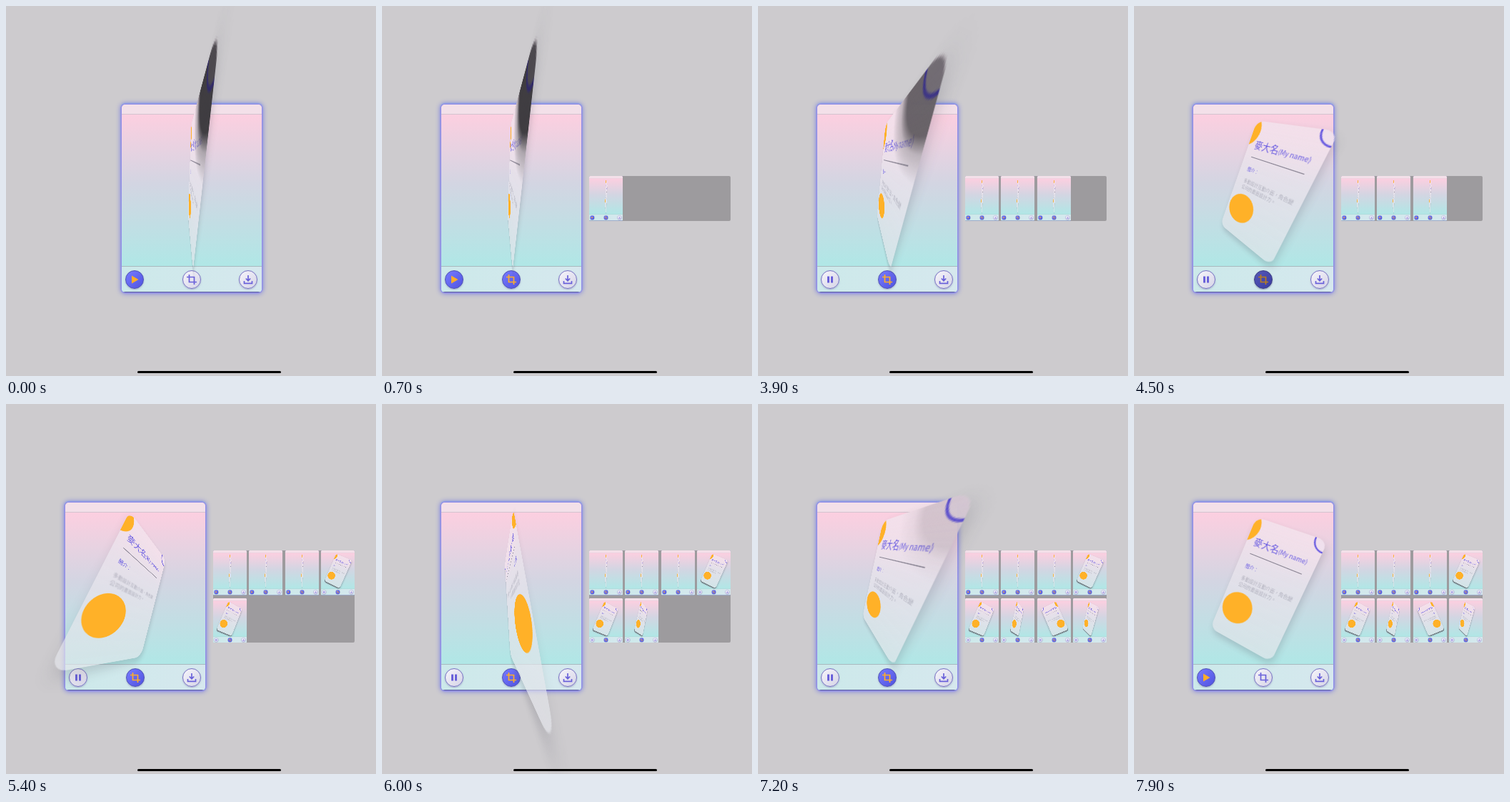
An HTML page that plays this animation: 518x518 px, repeating every 8000 ms.

```html
<!DOCTYPE html>
<html lang="zh-Hant">
<head>
<meta charset="utf-8">
<style>
html, body { margin: 0; width: 100%; height: 100%; overflow: hidden; background: #cdcbce; }
#stage { position: absolute; width: 518px; height: 518px; overflow: hidden; font-family: "Noto Sans CJK TC", "Noto Sans CJK", "Noto Sans", sans-serif; }
.win { position: absolute; left: 83px; top: 138px; width: 196px; height: 263px; }
.frame { position: absolute; inset: 0; border-radius: 5px; overflow: hidden; background: linear-gradient(#fccfe0 14px, #d3d5e2 110px, #b0e7e6 226px); }
.win > .frame { box-shadow: 0 0 0 1.5px #938fe6, 0 -1px 2px 1px #83a9ea, 0 0 6px 2px #8385dc; }
.head, .foot { position: absolute; left: 0; right: 0; box-sizing: border-box; }
.head { top: 0; height: 14px; background: #f3e0e9; border-bottom: 1px solid #d3c3cf; }
.foot { top: 226px; bottom: 0; background: linear-gradient(90deg, #cce9ea, #d6e8ee); border-top: 1px solid #a8b9be; border-bottom: 1px solid #565a9c; }
.btn { position: absolute; top: 232px; width: 26px; height: 26px; box-sizing: border-box; border-radius: 50%; border: 1.5px solid #7771c4; background: linear-gradient(135deg, #f7f5fb, #d5d4e6); box-shadow: 0 1px 2px #8884b088; color: #6a61da; }
.btn.on { background: linear-gradient(135deg, #777bff, #5053df); border-color: #4d50b4; color: #ffad29; }
.btn svg { position: absolute; left: -1.5px; top: -1.5px; width: 26px; height: 26px; fill: none; stroke: currentColor; stroke-width: 2; }
.solid { fill: currentColor; stroke: none; }
.btn.on .pause, .btn:not(.on) .play { display: none; }
.card { position: absolute; left: 47.5px; top: 31.5px; width: 101px; height: 177px; border-radius: 12px; overflow: hidden; background: linear-gradient(#f3dfea, #ebe5edb0 35%, #e2e4e9a8); box-shadow: 3px 5px 10px #50506038; }
.card > * { position: absolute; white-space: nowrap; }
.dot { width: 46px; height: 46px; border-radius: 50%; background: #ffb128; }
.ring { left: 84.5px; top: -15.5px; width: 28px; height: 28px; border: 2.5px solid #6557e0; border-radius: 50%; background: #e8e0f244; }
.name { left: 11px; top: 22px; color: #6557e0; font: 500 12.6px/19px "Noto Sans CJK TC", "Noto Sans CJK", "Noto Sans", sans-serif; }
.name small { font-size: 8.3px; }
.rule { left: 12px; top: 50px; width: 77px; height: 1px; background: #85808f; }
.label { left: 13px; top: 63px; color: #6557e0; font-size: 6.6px; line-height: 10px; }
.bio { left: 14px; top: 82px; color: #85859490; font-size: 6.5px; line-height: 9.5px; filter: blur(.4px); }
.shade { inset: 0; opacity: 0; background: radial-gradient(circle at 100% 0, #373539 33px, #77757990 43px, #b0aeb200 62px); }
#panel { position: absolute; left: 290px; width: 198px; border-radius: 2px; background: #9d9b9e; }
.thumb { position: absolute; width: 47px; height: 62.5px; border-radius: 1.5px; overflow: hidden; }
.thumb .win { left: 0; top: 0; transform: scale(.24, .238); transform-origin: 0 0; overflow: hidden; }
.thumb .edge { box-shadow: 0 7px 0 #7d8b91, 3px 5px 10px #50506060; }
#bar { position: absolute; left: 184px; top: 511px; width: 201px; height: 3px; border-radius: 2px; background: #000; }
</style>
</head>
<body>
<div id="stage">
  <div id="panel"></div>
  <div class="win" id="win">
    <div class="frame"><div class="head"></div><div class="foot"></div></div>
    <div class="btn" style="left:5px"><svg>
      <path class="play solid" d="M9 7.5 18.5 13 9 18.5z"/><path class="pause solid" d="M9 8.5h3v9H9zM14 8.5h3v9h-3z"/></svg></div>
    <div class="btn" style="left:85px"><svg>
      <path d="M9.5 6v10.5H20M6 9.5h10.5V20" stroke-width="1.7"/></svg></div>
    <div class="btn" style="left:164px"><svg>
      <path d="M13 7v7M9.8 11.5 13 14.7l3.2-3.2M7.5 15v3.3h11V15" stroke-width="1.7"/></svg></div>
    <div class="card">
      <div class="dot" style="left:-34px;top:-9px"></div>
      <div class="name">麥大名<small>(My name)</small></div>
      <div class="rule"></div>
      <div class="label">簡介：</div>
      <div class="bio">多動設計互動介面，角色變<br>公司的畫面設計力。</div>
      <div class="dot" style="left:3px;top:107px"></div>
      <div class="shade"></div>
      <div class="ring"></div>
    </div>
  </div>
  <div id="bar"></div>
</div>
<script>
const LOOP = 8000;
const START = 3770, STOP = 7650;
const cropClicks = [150, 1500, 2650, 4500, 5150, 5600, 6350, 6950];
const thumbAngles = [85, 85, 85, 12, -25, -62, -165, 55];
// card turn: [time, degrees]
const turn = [[START, 83], [4500, 21], [5000, -14], [5500, -48], [6000, -101.5], [6400, -203], [6700, -261], [STOP, -353]];

const win = document.getElementById('win');
const panel = document.getElementById('panel');
const [play, crop] = win.querySelectorAll('.btn');
const clamp = x => Math.min(1, Math.max(0, x));
const ease = x => x * x * (3 - 2 * x);

function slope(i) {
  const a = turn[Math.max(0, i - 1)], b = turn[Math.min(turn.length - 1, i + 1)];
  return (b[1] - a[1]) / (b[0] - a[0]);
}

function angleAt(t) {
  if (t <= START) return turn[0][1];
  if (t >= STOP) return turn[turn.length - 1][1];
  const i = turn.findIndex(p => p[0] > t) - 1;
  const [t0, a] = turn[i], [t1, b] = turn[i + 1];
  const d = t1 - t0, u = (t - t0) / d, e = ease(u);
  return a + (b - a) * e + d * u * (1 - u) * ((1 - u) * slope(i) - u * slope(i + 1));
}

function pose(root, angle, depth) {
  root.querySelector('.card').style.transform = `perspective(${depth}px) rotateY(${-angle}deg) rotateZ(24deg)`;
}

const thumbs = thumbAngles.map((angle, i) => {
  const box = document.createElement('div');
  const copy = win.cloneNode(true);
  copy.removeAttribute('id');
  const [p, c] = copy.querySelectorAll('.btn');
  p.classList.toggle('on', i < 3);
  c.classList.add('on');
  copy.querySelector('.card').classList.toggle('edge', i > 2);
  pose(copy, angle, 600);
  box.className = 'thumb';
  box.style.left = (i % 4) * 50.3 + 'px';
  box.style.top = i < 4 ? '0' : '66.5px';
  box.append(copy);
  panel.append(box);
  return box;
});

const pressed = (t, clicks) => clicks.some(c => t >= c - 60 && t < c + 110);
const press = (btn, down) => btn.style.filter = down ? 'brightness(.72)' : '';

function draw(t) {
  const angle = angleAt(t);
  const dark = Math.max(0, Math.sin(angle * Math.PI / 180)) ** 6;
  win.style.transform = `translateX(${79 * (1 - ease(clamp((t - 400) / 260)))}px)`;
  pose(win, angle, 107);
  win.querySelector('.shade').style.opacity = dark;
  win.querySelector('.ring').style.filter = `brightness(${1 - .55 * dark})`;

  play.classList.toggle('on', t < START || t >= STOP);
  crop.classList.toggle('on', t >= 260 && t < 7500);
  press(play, pressed(t, [START - 30, STOP - 30]));
  press(crop, pressed(t, cropClicks));

  const two = t >= cropClicks[4] + 100;
  panel.style.top = two ? '205px' : '238px';
  panel.style.height = two ? '129px' : '63px';
  panel.style.opacity = clamp((t - 450) / 200);
  thumbs.forEach((box, i) => box.style.display = t >= (i ? cropClicks[i] + 100 : 640) ? '' : 'none');
}

function tick() {
  draw(performance.now() % LOOP);
  requestAnimationFrame(tick);
}
tick();
</script>
</body>
</html>
```
